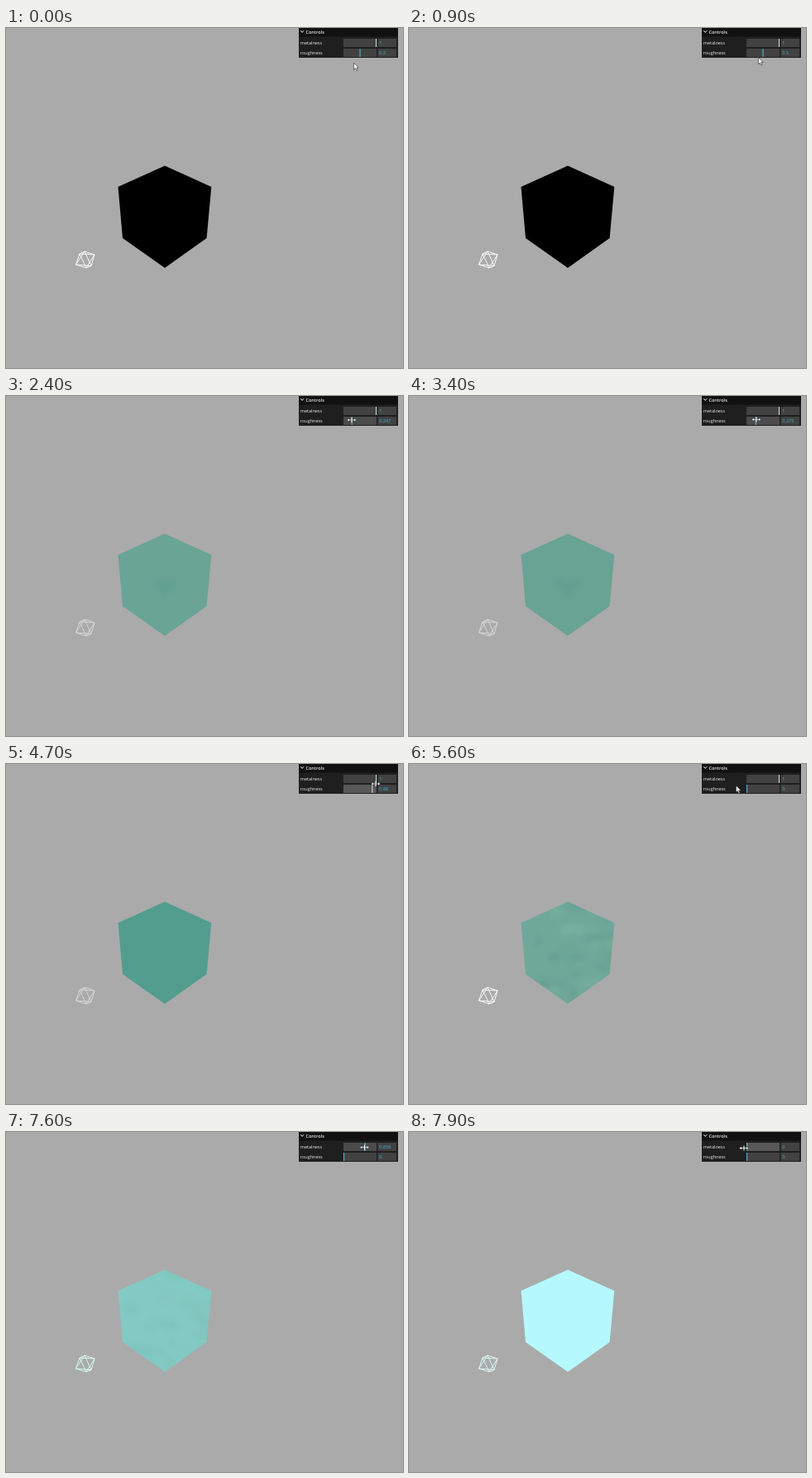
These frames come from a looping animation (480x411 px, 8 s). An HTML page:

```html
<!DOCTYPE html>
<html lang="en">
<head>
<meta charset="utf-8">
<title>Material controls</title>
<style>
  html, body { margin: 0; width: 100%; height: 100%; overflow: hidden; background: #aaa; }
  svg { display: block; width: 480px; height: 411px; }
  text { font: 5.5px "Open Sans", "Noto Sans", sans-serif; fill: #ebebeb; }
  .title { font-weight: 600; }
  .value { fill: #43b3cf; }
  .field { fill: #424242; }
</style>
</head>
<body>
<svg viewBox="0 0 480 411">
  <defs>
    <path id="hull" d="M192 166.5 248.3 192 242.6 254 192 290 141 254 135.5 192Z"/>
    <clipPath id="inside"><use href="#hull"/></clipPath>
    <filter id="soft" x="-50%" y="-50%" width="200%" height="200%"><feGaussianBlur stdDeviation="3"/></filter>
  </defs>
  <rect width="480" height="411" fill="#aaa"/>
  <use href="#hull" id="cube"/>
  <g clip-path="url(#inside)">
    <path id="shade" d="M176 220 192 225 209 220 192 244Z" fill="#3f8f7b" filter="url(#soft)"/>
    <g id="clouds" filter="url(#soft)"></g>
  </g>
  <path id="lamp" fill="none" stroke-width=".9" stroke-linejoin="round"
    d="M95 270 107 274 103 287.5 97 290 84.5 286 89 273ZM95 270 103 287.5 84.5 286ZM107 274 97 290 89 273Z"/>

  <rect x="354" width="120" height="36" fill="#1f1f1f"/>
  <rect x="354" width="120" height="10.5" fill="#111"/>
  <path d="M356.3 3.2 358.2 5.3 360.1 3.2" fill="none" stroke="#ebebeb" stroke-width="1"/>
  <text class="title" x="362.5" y="6.5">Controls</text>
  <g id="rows"></g>

  <path id="arrow" d="M0 0V8.2L1.9 6.5 3.2 9.4 4.6 8.8 3.3 6H5.8Z" fill="#fff" stroke="#222" stroke-width=".6"/>
  <g id="resize">
    <path d="M-5.5 0-3-2.3V-.7H3V-2.3L5.5 0 3 2.3V.7H-3V2.3Z" fill="#fff" stroke="#222" stroke-width=".6"/>
    <path d="M0-3V3" stroke="#fff" stroke-width="1"/>
  </g>
</svg>
<script>
const LOOP = 8000, STEP = 100, CUT = 1400;
const $ = id => document.getElementById(id);
const NS = "http://www.w3.org/2000/svg";

function add(parent, tag, attrs, text = "") {
  const el = document.createElementNS(NS, tag);
  for (const key in attrs) el.setAttribute(key, attrs[key]);
  el.textContent = text;
  return parent.appendChild(el);
}

// Linear lookup through [position, ...values] keys.
function sample(keys, p) {
  if (p <= keys[0][0]) return keys[0].slice(1);
  for (let i = 1; i < keys.length; i++) {
    const a = keys[i - 1], b = keys[i];
    if (p < b[0]) {
      const k = (p - a[0]) / (b[0] - a[0]);
      return a.slice(1).map((v, j) => v + (b[j + 1] - v) * k);
    }
  }
  return keys[keys.length - 1].slice(1);
}

const roughKeys = [[1800, .5], [2700, .12], [3400, .275], [4700, .88], [4900, 1], [5500, 0]];
const metalKeys = [[7400, 1], [7600, .656], [7900, 0]];
const introKeys = [[600, 420.5, 42], [1300, 425, 27]];
const pointerKeys = [
  [1400, 426, 18], [1700, 428, 29], [1800, 428, 29], [2700, 413, 29], [3400, 420, 28.5],
  [4700, 447, 24], [4900, 449, 25], [5500, 400, 26], [5600, 395.5, 26], [6500, 439, 18],
  [7300, 447, 18], [7400, 447, 18], [7600, 433.5, 18.5], [7900, 405, 19.5]
];
const tones = [[0, 111, 168, 153], [.275, 105, 163, 148], [.5, 98, 161, 146], [.88, 82, 157, 142], [1, 79, 155, 140]];
const matte = [181, 249, 255];
const mixPower = [1.13, .8, .8];

function makeRow(label, y) {
  const rows = $("rows");
  add(rows, "text", { x: 355.8, y: y + 6.8 }, label);
  const track = add(rows, "rect", { class: "field", x: 408, y, width: 40, height: 10 });
  add(rows, "rect", { class: "field", x: 449.5, y, width: 22.5, height: 10 });
  const mark = add(rows, "rect", { y, width: 1.1, height: 10 });
  const value = add(rows, "text", { class: "value", x: 451.3, y: y + 6.8 });
  return (v, fill, markFill) => {
    track.style.fill = fill;
    mark.setAttribute("x", 408 + v * 39);
    mark.setAttribute("fill", markFill);
    value.textContent = String(+v.toFixed(3));
  };
}
const showMetal = makeRow("metalness", 13);
const showRough = makeRow("roughness", 25);

let seed = 11;
const random = () => (seed = seed * 16807 % 2147483647) / 2147483647;
for (let i = 0; i < 32; i++) {
  add($("clouds"), "ellipse", {
    cx: 135 + random() * 115, cy: 168 + random() * 120,
    rx: 4 + random() * 10, ry: 3 + random() * 5,
    fill: i % 2 ? "#559384" : "#83baa9", opacity: .3
  });
}

function cubeColor(rough, metal) {
  const rgb = sample(tones, rough).map((c, i) => c + (matte[i] - c) * (1 - metal) ** mixPower[i]);
  return `rgb(${rgb.map(Math.round)})`;
}

function draw(t) {
  const lit = t >= CUT;
  const [rough] = sample(roughKeys, t);
  const [metal] = sample(metalKeys, t);
  const [x, y] = sample(lit ? pointerKeys : introKeys, t);

  $("cube").setAttribute("fill", lit ? cubeColor(rough, metal) : "#000");
  $("shade").setAttribute("opacity", lit ? .22 * metal * Math.max(0, 1 - Math.abs(rough - .35) * 2.2) : 0);
  $("clouds").setAttribute("opacity", lit ? Math.max(0, 1 - rough * 5) * metal ** 3 : 0);
  $("lamp").setAttribute("stroke", t >= 7500 ? "#dcfff8" : t >= 1900 && t < 5000 ? "#dadada" : "#fff");

  const dragRough = t >= 1900 && t <= 5500;
  const dragMetal = t >= 7500;
  const over = x >= 408 && x <= 448 && y < 36;
  const hover = top => over && y >= top && y < top + 10;
  const fill = (drag, top) => drag ? "#585858" : hover(top) ? "#4b4b4b" : "#424242";
  showMetal(metal, fill(t >= 7700, 13), metal === 1 ? "#d5dcdd" : "#4cc8dd");
  showRough(rough, fill(t >= 4000 && dragRough, 25), rough > .8 ? "#d5dcdd" : "#4cb8d2");

  const sliding = dragRough || dragMetal || hover(13) || hover(25);
  $("arrow").style.display = sliding ? "none" : "";
  $("resize").style.display = sliding ? "" : "none";
  $(sliding ? "resize" : "arrow").setAttribute("transform", `translate(${x} ${y})`);
}

const start = performance.now();
function tick() {
  const t = (performance.now() - start) % LOOP;
  draw(Math.floor(t / STEP) * STEP);
  requestAnimationFrame(tick);
}
tick();
</script>
</body>
</html>
```
